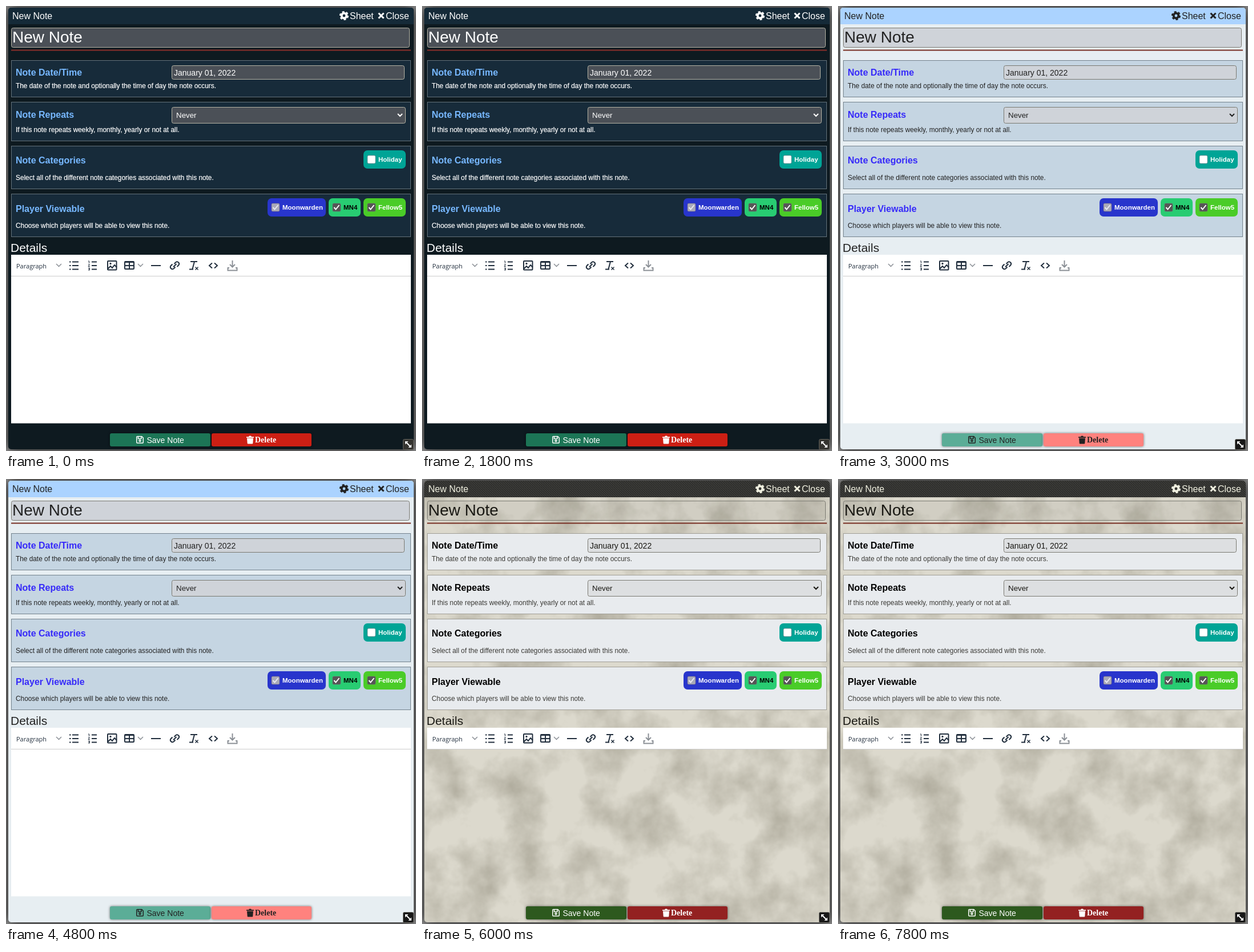
Recreate the animation shown at these times as an HTML page. Size 718 px wide and 780 px high, loop 9000 ms.

```html
<!DOCTYPE html>
<html lang="en">
<head>
<meta charset="utf-8">
<title>Note themes</title>
<style>
html, body { margin: 0; width: 100%; height: 100%; overflow: hidden; background: #979797; }
svg { display: block; font-family: "Liberation Sans", Arial, sans-serif; }
svg[data-theme=dark] {
  --window: #0e1a20; --bar: #152a38; --panel: #172b3a; --edge: #64727b; --input: #4b5057; --big: #4b5057;
  --field: #b5b3a4; --rule: #8a2f2b; --text: #fff; --barText: #fff; --label: #77b8ff; --hint: #fff;
  --save: #1c7556; --delete: #cc1f14; --button: #fff; --page: #fff; --grip: #34332f;
}
svg[data-theme=light] {
  --window: #e7eef2; --bar: #abd3ff; --panel: #c5d5e2; --edge: #73828d; --input: #cfd3d9; --big: #cfd3d9;
  --field: #7a7971; --rule: #782e22; --text: #222; --barText: #222; --label: #372bf9; --hint: #222;
  --save: #5bad97; --delete: #ff827e; --button: #222; --page: #fff; --grip: #171717;
}
svg[data-theme=paper] {
  --window: #dcd9cd; --bar: url(#weave); --panel: #e8ebee; --edge: #a09e96; --input: #dddfe1; --big: #0000000d;
  --field: #7a7971; --rule: #782e22; --text: #191813; --barText: #f0f0e0; --label: #000; --hint: #3b3a36;
  --save: #2d591e; --delete: #932121; --button: #fff; --page: none; --grip: #171717;
}
svg:not([data-theme=paper]) .grain { display: none; }
svg[data-theme=dark] .hint { stroke: #fff; stroke-width: .2; }
.window { fill: var(--window); filter: drop-shadow(0 0 10px #000); }
.bar { fill: var(--barText); font-size: 16px; }
.panel { fill: var(--panel); stroke: var(--edge); }
.field { fill: var(--input); stroke: var(--field); }
.text { fill: var(--text); }
.label { fill: var(--label); font: bold 16px "Liberation Sans", Arial, sans-serif; }
.hint { fill: var(--hint); font-size: 11.85px; }
.pill { font: bold 11.5px "Liberation Sans", Arial, sans-serif; }
.line { fill: none; stroke: #222f3e; stroke-width: 2; }
.soft { stroke: #8b9096; }
.button { filter: drop-shadow(0 0 2px #0008); }
</style>
</head>
<body>
<svg id="stage" width="718" height="780" viewBox="0 0 718 780" data-theme="dark">
  <defs>
    <pattern id="weave" width="4" height="4" patternUnits="userSpaceOnUse">
      <path d="M0 0h4v4H0z" fill="#2f2f2d"/>
      <path d="M0 0l4 4M3 0h1v1" stroke="#444440"/>
    </pattern>
    <filter id="grain" x="0" y="0" width="1" height="1" color-interpolation-filters="sRGB">
      <feTurbulence type="fractalNoise" baseFrequency=".014" numOctaves="5" seed="4"/>
      <feColorMatrix values="0 0 0 0 .45  0 0 0 0 .43  0 0 0 0 .36  .8 0 0 0 -.3"/>
    </filter>
  </defs>

  <rect class="window" x="4" y="3" width="710" height="774" rx="5"/>
  <rect class="grain" x="4" y="32" width="710" height="745" filter="url(#grain)"/>
  <path d="M4 32V8a5 5 0 0 1 5-5h700a5 5 0 0 1 5 5v24z" fill="var(--bar)"/>
  <g class="bar">
    <text x="11" y="22.5">New Note</text>
    <text x="602" y="22.5">Sheet</text>
    <text x="665" y="22.5">Close</text>
    <g fill="none" stroke="var(--barText)">
      <circle cx="592" cy="17" r="4.3" stroke-width="3.8"/>
      <circle cx="592" cy="17" r="6.8" stroke-width="2.6" stroke-dasharray="3.9 3.22"/>
      <path d="M652.5 12.5l9 9m0-9l-9 9" stroke-width="3"/>
    </g>
  </g>

  <rect class="field" x="9.5" y="38.5" width="697" height="34" rx="3" style="fill:var(--big)"/>
  <text class="text" x="11" y="64" font-size="28">New Note</text>
  <path d="M9 77.5h700" stroke="var(--rule)" stroke-width="2"/>

  <g id="panels"></g>
  <rect class="field" x="290.5" y="104.5" width="407" height="24" rx="3"/>
  <text class="text" x="294" y="121.5" font-size="14">January 01, 2022</text>
  <rect class="field" x="290.5" y="177.5" width="409" height="28" rx="3"/>
  <text class="text" x="298" y="195.5" font-size="13.33">Never</text>
  <path d="M686 189l4 4 4-4" fill="none" stroke="var(--text)" stroke-width="2"/>
  <g id="pills"></g>

  <text class="text" x="8" y="431" font-size="21">Details</text>
  <path d="M9 474h700v257.500H9z" fill="var(--page)"/>
  <path d="M9 436h700v37H9z" fill="#fff"/>
  <path d="M9 473.500h700" stroke="#ccc"/>
  <text x="18" y="459.500" font-size="11" fill="#222f3e" style="font-family:'Open Sans',sans-serif">Paragraph</text>
  <g class="line">
    <path class="soft" stroke-width="1.500" d="M88 452l4.500 4.500 4.500-4.500M231 452l4.500 4.500 4.500-4.500" style="stroke-width:1.500"/>
    <path d="M111 448.500h2.500m2.500 0h11M111 455h2.500m2.500 0h11M111 461.500h2.500m2.500 0h11"/>
    <path d="M150 448.500h9M150 455h9M150 461.500h9"/>
    <path d="M144 447h1.500v4M144 453h2.500l-2.500 3.500h3M144 459h2.500v4H144m0-2h2" style="stroke-width:1"/>
    <rect x="178" y="447" width="15.500" height="15.500" rx="1"/>
    <path d="M178 461l5-5 3 3 4-5 4 4"/>
    <circle cx="183" cy="451.500" r=".7"/>
    <rect x="208" y="448" width="16" height="13" rx="1"/>
    <path d="M208 449h16M208 455h16M216 449v12M254 455h17"/>
    <path d="M293 457.500l5.500-5.500M294.500 452l3-3a3.600 3.600 0 0 1 5 5l-3 3M296.500 457.500l-3 3a3.600 3.600 0 0 1-5-5l3-3"/>
    <path d="M323 448h12M330 448l-3.500 13M321 461.500h7"/>
    <path d="M331.500 457.500l5 5m0-5l-5 5" style="stroke-width:1.500"/>
    <path d="M361 450.500l-5 4.500 5 4.500M365 450.500l5 4.500-5 4.500"/>
    <path class="soft" d="M396.500 446v11M392 453l4.500 4.500 4.500-4.500M391 459h-2.500v4.500h16V459H402"/>
  </g>

  <rect class="button" x="182" y="749" width="176" height="23" rx="3" fill="var(--save)"/>
  <rect class="button" x="360" y="749" width="175" height="23" rx="3" fill="var(--delete)"/>
  <g fill="var(--button)">
    <g fill="none" stroke="var(--button)" stroke-width="1.500">
      <path d="M228.800 755.500q0-1 1-1h8l2.500 2.500v8q0 1-1 1h-9.500q-1 0-1-1z"/>
      <path d="M231.500 755v3.500h5.500V755"/>
      <circle cx="234.500" cy="762" r="1.500"/>
    </g>
    <text x="246.500" y="765.500" font-size="14">Save Note</text>
    <path d="M421 755h4l1-1.500h3l1 1.500h4v1.800h-13zM422 757.500h11l-.7 9q-.1 1-1 1h-7.600q-.9 0-1-1z"/>
    <text x="436" y="765" font-size="14" font-weight="bold" style="font-family:'Liberation Serif',Times,serif">Delete</text>
  </g>
  <rect x="695.500" y="759.500" width="18" height="18" rx="2" fill="var(--grip)" stroke="#65645e"/>
  <path d="M701 765l7 7" stroke="#fff" stroke-width="2"/>
  <path d="M699 763h5.500l-5.500 5.500zM710 774v-5.500l-5.500 5.500z" fill="#fff"/>
</svg>

<script>
const stage = document.getElementById("stage");

// top, height, label baseline, hint baseline, label, hint
const panels = [
  [95, 64, 121.5, 144, "Note Date/Time", "The date of the note and optionally the time of day the note occurs."],
  [168, 68, 196, 221, "Note Repeats", "If this note repeats weekly, monthly, yearly or not at all."],
  [245, 75, 276, 304.5, "Note Categories", "Select all of the different note categories associated with this note."],
  [329, 75, 361, 388.5, "Player Viewable", "Choose which players will be able to view this note."]
];
document.getElementById("panels").innerHTML = panels.map(([y, h, labelY, hintY, label, hint]) =>
  `<rect class="panel" x="9.5" y="${y + .5}" width="699" height="${h}"/>
   <text class="label" x="17" y="${labelY}">${label}</text>
   <text class="hint" x="17" y="${hintY}">${hint}</text>`).join("");

// left, top, width, fill, text colour, box colour, tick colour, name
const pills = [
  [626, 253, 74, "#00a496", "#fff", "#fff", "none", "Holiday"],
  [458, 337, 102, "#2835cc", "#fff", "#a9aab9", "#e9e9f2", "Moonwarden"],
  [565, 337, 56, "#28cc72", "#000", "#555", "#fff", "MN4"],
  [626, 337, 74, "#4acc28", "#fff", "#555", "#fff", "Fellow5"]
];
document.getElementById("pills").innerHTML = pills.map(([x, y, w, fill, ink, box, tick, name]) =>
  `<g class="pill" transform="translate(${x} ${y})">
     <rect width="${w}" height="32" rx="7" fill="${fill}"/>
     <rect x="7" y="9" width="14" height="14" rx="2" fill="${box}" stroke="#7678" />
     <path d="M9.500 16l3 3.500 6-7.500" fill="none" stroke="${tick}" stroke-width="2"/>
     <text x="26" y="20" fill="${ink}">${name}</text>
   </g>`).join("");

const themes = ["dark", "light", "paper"];
function draw() {
  stage.dataset.theme = themes[Math.floor(performance.now() / 3000) % themes.length];
  requestAnimationFrame(draw);
}
draw();
</script>
</body>
</html>
```
